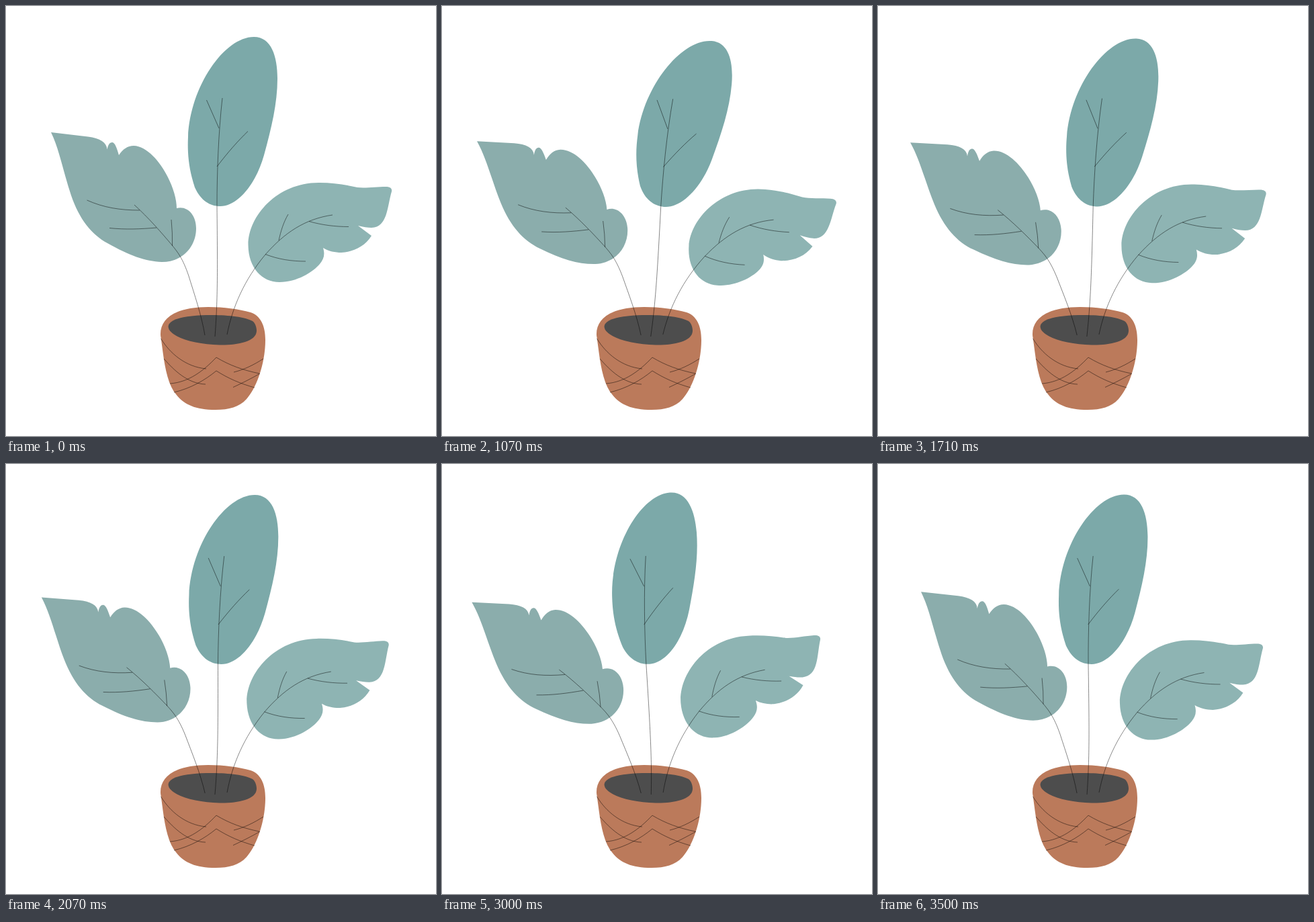
Animation, 640 px wide and 640 px high, one loop 3570 ms. Source, as an HTML page:

```html
<!DOCTYPE html>
<html lang="en">
<head>
<meta charset="utf-8">
<title>Swaying plant</title>
<style>
html, body { margin: 0; width: 100%; height: 100%; overflow: hidden; background: #fff; }
svg { display: block; width: 100vw; height: 100vh; }
.line { fill: none; stroke: #000; stroke-width: .75; stroke-opacity: .62; }
</style>
</head>
<body>
<svg viewBox="0 0 640 640">
  <path fill="#bb7a5b" d="M230 490C229 465 252 448 301 448C325 448 346 451 364 456C379 461 386 476 386 497C386 530 374 567 358 585C347 597 332 601 312 601C278 601 262 591 250 574C236 552 234 515 230 490Z"/>
  <path fill="#4d4d4d" d="M241.5 477C243 465 270 460 307 460C332 460 356 463 367 469C371 472 373 478 373 484C372 500 343 505 318 504.5C279 503.5 242 492 241.5 477Z"/>
  <path class="line" d="M230.5 495C244 517 267 537 298 540M235 525C250 542 270 562 297 563M244 562C272 560 294 543 313 523C333 535 353 542 377 547M250 575C275 569 296 557 313 543C332 555 349 562 370 568M383 525C369 534 355 541 339 545M378 547C364 555 352 561 338 567.5"/>

  <g id="left">
    <path class="leaf" fill="#8badac" d="M67 188L122 194.5C140 197 150 203 150.5 213.5C152 207 154 203 158 203C162 203 165 211 168 222C174 213 181 208 190 208C222 209 254 268 254 301C271 297 283 312 283 331C283 357 264 381 232 381C207 380 183 371 151 353C127 340 109 317 97 282C86 250 80 215 67 188Z"/>
    <path class="line" d="M296 490C291 460 280 428 272 402C263 375 255 366 248 357C232 338 212 315 191 296M120.5 289C145 300 170 304 199 304M154 330.5C178 333 200 332 224 330M246 318Q248 338 247.5 357"/>
  </g>
  <g id="middle">
    <path class="leaf" fill="#7ca9a9" d="M281 270C271 240 270 215 271 195C274 120 325 46 369 46C395 46 404 75 404 108C404 145 395 182 384 222C372 265 345 298 319 298C304 298 290 290 281 270Z"/>
    <path class="line" d="M311 492C315 440 315 400 314 298C314 250 316 190 322 137M298.5 140L317 182M360 186.5C345 201 330 218 314 239"/>
  </g>
  <g id="right">
    <path class="leaf" fill="#8eb4b3" d="M523 270C505 266 487 263 467 263C404 262 360 313 360.5 356C361 390 381 411 407 411C433 411 457 396 467 384C473 377 475 370 472 360C480 365 490 367 499 367C517 366 534 358 544 342L524 327C532 329 538 330 544 330C568 329 567 300 574 276C575 271 571 269 565 269C552 269 534 271.5 523 270Z"/>
    <path class="line" d="M329 489C337 448 355 407 386 370C415 337 445 317 486 311M420 310C413 322 409 335 406 349M451 320.5C470 326 490 328.5 510 328.5M386 369.5C405 377 425 380 446 380"/>
  </g>
</svg>
<script>
const LOOP = 3570;

// sway turns the whole stalk about root; bend turns the blade about neck.
// Keys are [ms, radians].
const stalks = [
  { id: 'left', root: [296, 487], neck: [258, 376],
    sway: [[0, 0], [420, .035], [1400, -.0745], [2480, -.053], [3120, -.098], [3550, 0], [LOOP, 0]],
    bend: [[0, 0], [730, -.036], [2450, .037], [LOOP, 0]] },
  { id: 'middle', root: [311, 487], neck: [315, 285],
    sway: [[0, 0], [1190, .069], [2980, -.0555], [3555, 0], [LOOP, 0]],
    bend: [[0, 0], [1190, .025], [2760, -.036], [LOOP, 0]] },
  { id: 'right', root: [329, 485], neck: [372, 390],
    sway: [[0, 0], [1190, .0495], [2620, -.0515], [3555, 0], [LOOP, 0]],
    bend: [[0, 0], [1190, .039], [2720, -.054], [LOOP, 0]] }
];

function at(keys, t) {
  const i = keys.findIndex(k => k[0] > t);
  const [t0, a] = keys[i - 1], [t1, b] = keys[i];
  return a + (b - a) * (t - t0) / (t1 - t0);
}

function turn(el, angle, [x, y]) {
  el.setAttribute('transform', `rotate(${angle * 180 / Math.PI} ${x} ${y})`);
}

for (const s of stalks) {
  s.el = document.getElementById(s.id);
  s.leaf = s.el.querySelector('.leaf');
}

let start;
function draw(now) {
  start ??= now;
  const t = (now - start) % LOOP;
  for (const s of stalks) {
    turn(s.el, at(s.sway, t), s.root);
    turn(s.leaf, at(s.bend, t), s.neck);
  }
  requestAnimationFrame(draw);
}
requestAnimationFrame(draw);
</script>
</body>
</html>
```
